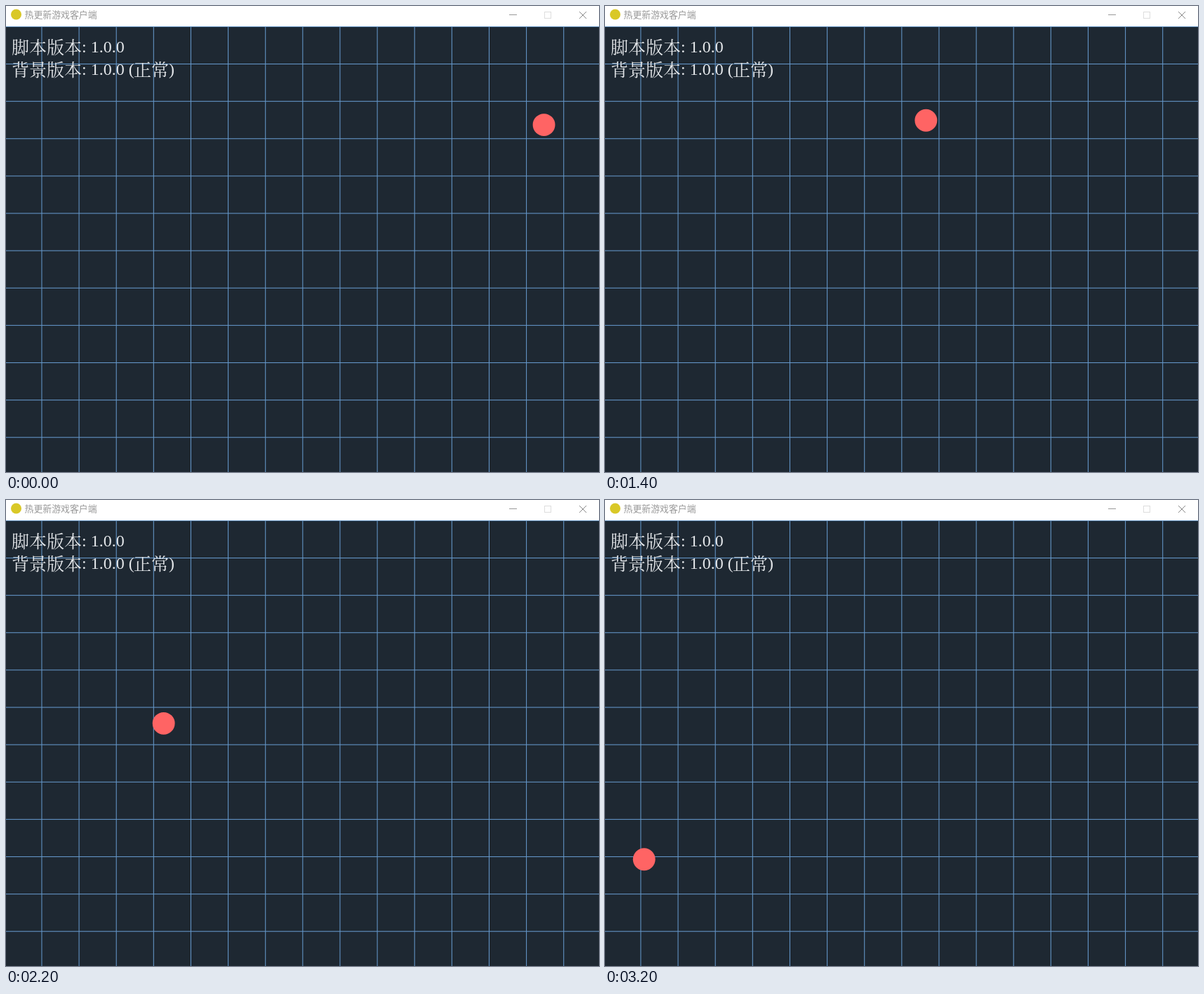
Recreate the animation shown at these times as an HTML page with a canvas. Size 845 by 663 pixels, loop 3300 ms.

```html
<!DOCTYPE html>
<html lang="zh-CN">
<head>
<meta charset="utf-8">
<style>
  html, body { margin: 0; width: 100%; height: 100%; overflow: hidden; background: #1e2832; }
  canvas { display: block; }
</style>
</head>
<body>
<canvas id="stage" width="845" height="663"></canvas>
<script>
const ctx = document.getElementById('stage').getContext('2d');
const W = 845, H = 663, BAR = 29;
// The 800-unit game view is scaled, so its lines fall between pixels.
const SCALE = 1.0625, LEFT = -2.7, TOP = 28.85;
const LOOP = 3300, TICK = 100;
const SANS = '"Noto Sans CJK SC", "Noto Sans CJK", sans-serif';
const CJK = '300 25px "Noto Serif CJK SC", "Noto Sans CJK SC", "Noto Sans CJK", serif';
const LATIN = '24px "Liberation Serif", serif';

function text(str, x, y, font, color) {
  ctx.font = font;
  ctx.fillStyle = color;
  ctx.fillText(str, x, y);
}

function disc(x, y, r, color) {
  ctx.fillStyle = color;
  ctx.beginPath();
  ctx.arc(x, y, r, 0, 7);
  ctx.fill();
}

function line(x1, y1, x2, y2) {
  ctx.beginPath();
  ctx.moveTo(x1, y1);
  ctx.lineTo(x2, y2);
  ctx.stroke();
}

function drawGrid() {
  ctx.fillStyle = '#1e2832';
  ctx.fillRect(0, BAR, W, H - BAR);
  ctx.fillStyle = '#6496c8';
  const cell = 50 * SCALE;
  for (let i = 1; i < 16; i++) ctx.fillRect(i * cell + LEFT, BAR, SCALE, H);
  for (let i = 0; i < 12; i++) ctx.fillRect(0, i * cell + TOP, W, SCALE);
}

function drawBall(t) {
  const k = Math.floor(t / TICK);
  // The game advances whole steps, about 9 per tick.
  const n = k && Math.round(1.26 + 9.132 * k);
  const x = Math.abs(774 - Math.abs(3 * n - 48)) - 2;
  const y = Math.abs(132 - 2 * n);
  disc(x * SCALE + LEFT, y * SCALE + TOP, 15 * SCALE, '#ff6464');
}

function drawLabels() {
  const white = '#e4e7ea';
  text('脚本版本', 8, 67.5, CJK, white);
  text(': 1.0.0', 108, 66, LATIN, white);
  text('背景版本', 8, 99.5, CJK, white);
  text(': 1.0.0 (', 108, 98, LATIN, white);
  text('正常', 182, 99.5, CJK, white);
  text(')', 232, 98, LATIN, white);
}

function drawTitleBar() {
  ctx.fillStyle = '#fff';
  ctx.fillRect(0, 0, W, BAR);
  disc(14.5, 12, 7.5, '#d9c827');
  text('热更新游戏客户端', 26.5, 17.3, '12.9px ' + SANS, '#999');
  ctx.lineWidth = 1;
  ctx.strokeStyle = '#999';
  line(717, 12.5, 728, 12.5);
  ctx.strokeStyle = '#ddd';
  ctx.strokeRect(767.5, 8.5, 9, 9);
  ctx.strokeStyle = '#888';
  line(817, 8, 827, 18);
  line(827, 8, 817, 18);
}

function frame(now) {
  drawGrid();
  drawBall(now % LOOP);
  drawLabels();
  drawTitleBar();
  requestAnimationFrame(frame);
}
frame(0);
</script>
</body>
</html>
```
